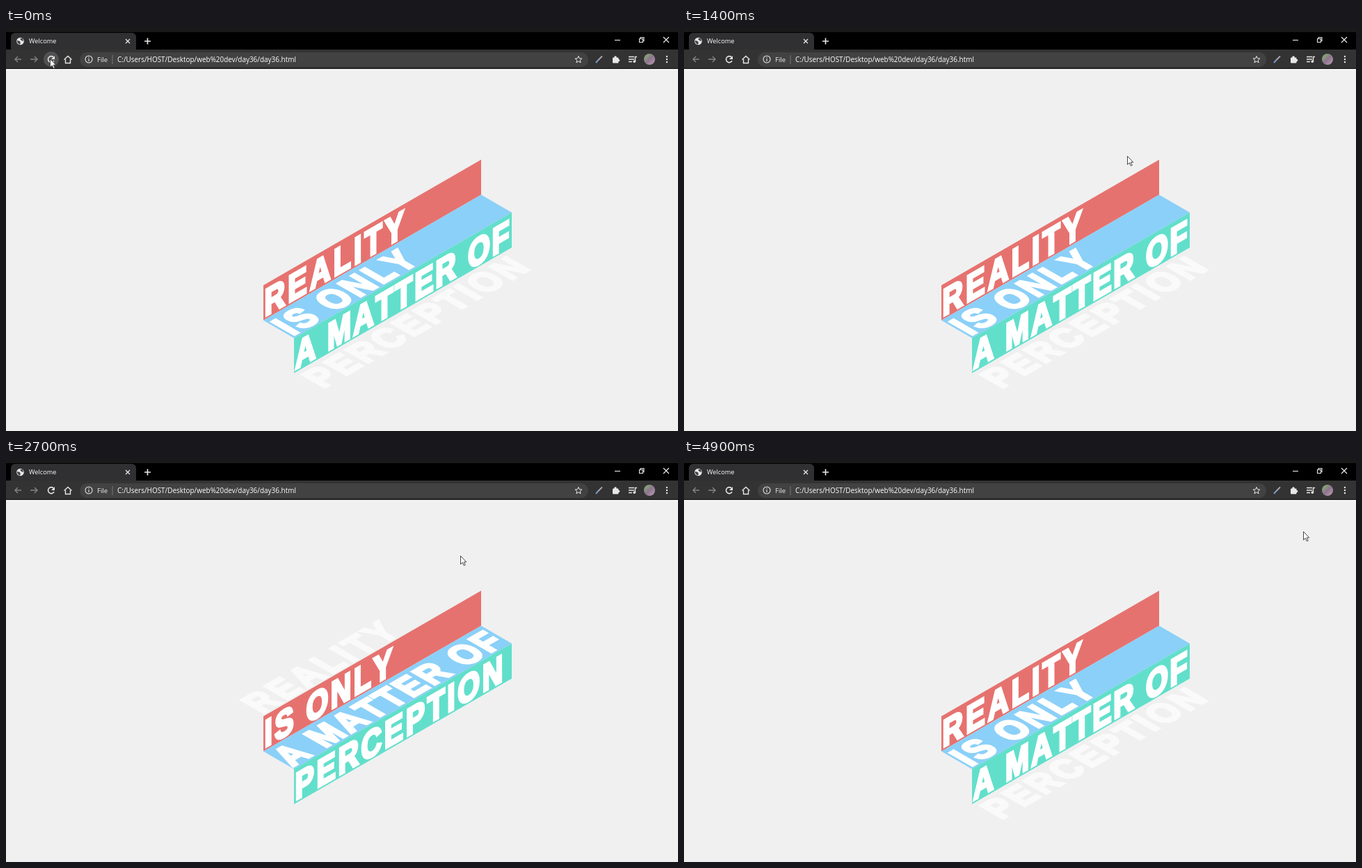
Animation, 966 px wide and 580 px high, one loop 5.3 s. Source, as an HTML page with a canvas:

```html
<!DOCTYPE html>
<html lang="en">
<head>
<meta charset="utf-8">
<title>Welcome</title>
<style>
html, body { margin: 0; width: 100%; height: 100%; overflow: hidden; background: #f0f0f0; }
canvas { display: block; }
</style>
</head>
<body>
<canvas id="stage" width="966" height="580"></canvas>
<script>
const ctx = document.getElementById('stage').getContext('2d');
const LOOP = 5300, STEP = 100;
const ROW = 38, SLOPE = Math.tan(Math.PI / 6);
const SMALL = 15, LARGE = 41;

// word and letter spacing at full size
const WORDS = [['', 0], ['REALITY', 4.2], ['IS ONLY', 3.3], ['A MATTER OF', 2.8], ['PERCEPTION', 3.6], ['', 0]];
const FILLS = [null, '#e6726f', '#8bd0f8', '#62dfcb', null];

// time, x, y of the pointer
const POINTER = [
  [0, 63, 44], [300, 63, 44], [800, 454, 59], [1400, 637, 184], [1900, 637, 196], [2400, 642, 184],
  [2700, 653, 139], [3100, 660, 106], [3600, 660, 106], [4800, 889, 109], [4900, 890, 104], [LOOP, 890, 104]
];

const lerp = (a, b, k) => a + (b - a) * k;
const ease = k => (k = Math.min(1, Math.max(0, k)), k * k * (3 - 2 * k));
const ramp = (t, from, to) => ease((t - from) / (to - from));

function rect(x, y, w, h, color) {
  ctx.fillStyle = color;
  ctx.fillRect(x, y, w, h);
}

function round(x, y, w, h, r, color) {
  ctx.fillStyle = color;
  ctx.beginPath();
  ctx.roundRect(x, y, w, h, r);
  ctx.fill();
}

function disc(x, y, r, color) {
  ctx.fillStyle = color;
  ctx.beginPath();
  ctx.arc(x, y, r, 0, 7);
  ctx.fill();
}

function line(d, color, width = 1.4) {
  ctx.strokeStyle = color;
  ctx.lineWidth = width;
  ctx.stroke(new Path2D(d));
}

function fill(d, color) {
  ctx.fillStyle = color;
  ctx.fill(new Path2D(d));
}

function label(text, x, y, size, color) {
  ctx.font = `${size}px "Open Sans", sans-serif`;
  ctx.fillStyle = color;
  ctx.fillText(text, x, y);
}

function drawRows(grow, shift) {
  const size = lerp(SMALL, LARGE, grow), heavy = grow > 0.75;
  const width = size * (heavy ? 7.634 : 6.39);
  const base = 29.4 + 0.131 * size;
  let x = 526.5 - width / 2 - 44;
  let y = 279.8 + width / 2 * SLOPE - 25.4;

  FILLS.forEach((color, i) => {
    const flat = i % 2 === 0;
    const vx = flat ? 44 / ROW : 0, vy = (flat ? 25.4 : 50.6) / ROW;
    const shade = Math.round(lerp(0, color ? 255 : 250, grow));
    ctx.save();
    ctx.transform(1, -SLOPE, vx, vy, x, y);
    if (color) rect(0, 0, width, ROW, color);
    ctx.beginPath();
    ctx.rect(0, 0, width + 8, ROW);
    ctx.clip();
    ctx.font = `${grow < 0.3 ? 400 : 700} ${size}px "Liberation Sans", Arial, sans-serif`;
    ctx.fontKerning = 'none';
    ctx.fillStyle = ctx.strokeStyle = `rgb(${shade},${shade},${shade})`;
    ctx.lineWidth = 3;
    ctx.lineJoin = 'miter';
    ctx.miterLimit = 3;
    for (let k = 0; k < 2; k++) {
      const [word, gap] = WORDS[i + k];
      const tx = heavy ? 1.5 : 0.5, ty = base + (k - shift) * ROW;
      ctx.letterSpacing = (heavy ? gap * size / LARGE : -1.15) + 'px';
      ctx.fillText(word, tx, ty);
      if (heavy) ctx.strokeText(word, tx, ty);
    }
    ctx.restore();
    x += vx * ROW;
    y += vy * ROW;
  });
}

function drawBrowser(loading, hover) {
  const light = '#e8e8e8', dim = '#858585';
  rect(0, 0, 966, 6, '#191919');
  rect(0, 6, 966, 26, '#000');
  round(7, 7, 180, 34, 6, '#303032');
  rect(0, 31, 966, 28, '#333334');
  rect(0, 57.5, 966, 1.5, '#222');
  rect(0, 59, 966, 1.5, '#fafafa');

  // tab
  if (loading) {
    line('M20 14a5 5 0 1 1 -5 5', '#9ab8e8');
  } else {
    disc(20.5, 19, 5.3, light);
    fill('M16 18l4 1 1 3-2 2-3-4zM20 15l4 0 1 4-3-1z', '#454545');
  }
  label('Welcome', 33, 22.3, 9.2, '#fff');
  line('M172 16l6 6m0-6l-6 6', light, 1.3);
  line('M199 19h9m-4.5-4.5v9', light, 1.7);

  // window buttons
  line('M875 17.5h8', light, 1.1);
  line('M910.5 15.5h5v5h-5zM912 15v-1.5h5v5h-1.5', light, 1.1);
  line('M945 13l8 8m0-8l-8 8', light, 1.2);

  // navigation
  line('M22 45h-9m4-4l-4 4 4 4', dim);
  line('M35 45h10m-4-4l4 4-4 4', dim);
  if (hover) disc(65, 45, 11, '#515153');
  if (loading) {
    line('M61 41l8 8m0-8l-8 8', light);
  } else {
    line('M69 47.2a4.5 4.5 0 1 1 -1 -5.5', light, 1.6);
    fill('M70 40v5h-5z', light);
  }
  line('M83.5 45.5l5.5-5 5.500 5M85.5 45v5.500h7v-5.500', light);

  // address
  round(106, 35, 731, 21, 10.5, '#424243');
  line('M124 45a5 5 0 1 1 -10 0a5 5 0 1 1 10 0M119 44v4M119 41.6v1.2', light, 1.1);
  label('File', 131, 48.7, 9.5, '#eee');
  rect(152.5, 39, 1, 13, '#777');
  label('C:/Users/HOST/Desktop/web%20dev/day36/day36.html', 160, 48.7, 9.95, '#fff');

  // toolbar buttons
  line('M823 40.5l1.4 3.2 3.5.3-2.7 2.3.9 3.5-3.1-1.9-3.1 1.9.9-3.5-2.7-2.3 3.5-.3z', light, 1);
  line('M848 50l3-3.5', '#6f9bd2', 2);
  line('M851 46.5l6-6', '#a9a9b5', 1.8);
  round(872, 42.5, 8.5, 8, 1, light);
  disc(876, 42, 1.8, light);
  disc(880.5, 46.5, 1.8, light);
  line('M895 41.5h8M895 45h8M895 48.5h5M904.5 48v-6.5h2.5', light, 1.4);
  disc(903.3, 48.3, 1.8, light);
  const tone = ctx.createLinearGradient(918, 38, 932, 52);
  tone.addColorStop(0, '#88b36c');
  tone.addColorStop(0.5, '#8c7590');
  tone.addColorStop(1, '#bb9aad');
  disc(925, 45, 8, tone);
  for (const dy of [-4, 0, 4]) disc(950, 45 + dy, 1.2, light);
}

function drawPointer(t) {
  const i = POINTER.findIndex(p => p[0] > t);
  const [t0, x0, y0] = POINTER[i - 1], [t1, x1, y1] = POINTER[i];
  const k = (t - t0) / (t1 - t0);
  const x = lerp(x0, x1, k), y = lerp(y0, y1, k);
  ctx.save();
  ctx.translate(x, y);
  if (x > 106 && x < 837 && y < 62) {
    line('M-2.5-5.5h2l.5.5.5-.5h2M0-5v10M-2.5 5.5h2l.5-.5.5.5h2', y > 57 ? '#444' : '#bbb', 1.1);
  } else {
    const arrow = 'M.5.5v12l2.8-2.6 2 4.4 1.9-.9-2-4.2h3.5z';
    fill(arrow, '#fff');
    line(arrow, '#333', 0.9);
  }
  ctx.restore();
}

function draw(now) {
  const t = Math.floor(now % LOOP / STEP) * STEP;
  const grow = t < 600 ? 1 : ramp(t, 600, 1000);
  const shift = ramp(t, 1500, 1900) - ramp(t, 2700, 3100);
  rect(0, 0, 966, 580, '#f0f0f0');
  drawRows(grow, shift);
  drawBrowser(t >= 300 && t < 700, t < 300);
  drawPointer(t);
}

const start = performance.now();
function tick() {
  draw(performance.now() - start);
  requestAnimationFrame(tick);
}
tick();
</script>
</body>
</html>
```
